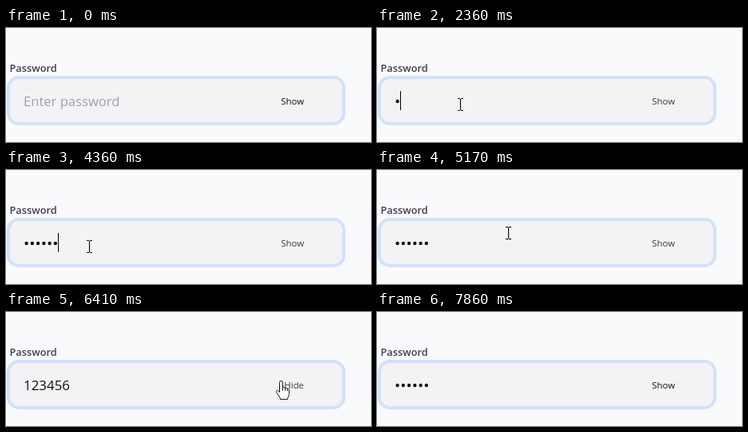
An HTML page for the animation above (8.74 s loop, 457 px wide and 143 px high).

```html
<!DOCTYPE html>
<html lang="en">
<head>
<meta charset="utf-8">
<title>Password field</title>
<style>
  html, body { margin: 0; width: 100%; height: 100%; overflow: hidden; background: #f8fafc; }
  svg { display: block; width: 457px; height: 143px; }
  text { font-family: "Open Sans", "Noto Sans", sans-serif; }
  #label { font-size: 12.8px; font-weight: 600; fill: #3f3d56; }
  #hint { font-size: 16.6px; fill: #9ea2ab; }
  #plain { font-size: 16.9px; fill: #111; }
  #toggle { font-size: 11.4px; text-anchor: end; }
  #glow { fill: #fdf046; mix-blend-mode: multiply; }
  .solid { fill: #fff; stroke: #111; stroke-linejoin: round; }
</style>
</head>
<body>
<svg viewBox="0 0 457 143">
  <text id="label" x="4.5" y="55">Password</text>
  <rect x="3" y="62" width="420" height="58" rx="13" fill="#f2f3f5" stroke="#d1e2fa" stroke-width="4"/>
  <text id="hint" x="22" y="98">Enter password</text>
  <text id="plain" x="22" y="98">123456</text>
  <g id="dots" fill="#111"></g>
  <rect id="caret" y="79" width="1" height="24"/>
  <text id="toggle" x="373" y="96"></text>
  <circle id="glow" r="12"/>
  <g id="pointer">
    <path id="beam" d="M-3.5-7.5h3m1 0h3M0-7V7M-3.5 7.5h3m1 0h3" fill="none" stroke="#111" stroke-width="1.2"/>
    <path id="hand" class="solid" d="M-2.5 2a2 2 0 0 1 4 0v6q1.7-1 3 .8q1.7-.8 2.8.8q2-.4 2.2 1.5v5c0 3-2 4-2 7h-9c0-3-3.5-6-5-9c-.8-1.8 1.2-3.1 2.5-1.5l1.5 1.6zM1.5 8v4M4.5 8.8v3.4M7.3 9.6v3"/>
    <path id="arrow" class="solid" d="M0 0v16l3.7-3.4 2.6 5.8 2.6-1.2-2.6-5.6h5.2z"/>
  </g>
</svg>
<script>
const LOOP = 8740, PITCH = 7.25, LEFT = 22;
const KEYS = [2360, 2710, 2970, 3300, 4030, 4360];
const CARET_ON = [[1380, 1900], [2360, 3830], [4030, 4890], [5420, 5940]];
const GLOW_ON = [[1250, 1380], [6140, 6340], [6870, 7130]];

const $ = id => document.getElementById(id);
const show = (id, on) => $(id).style.display = on ? "" : "none";
const within = (t, spans) => spans.some(([a, b]) => t >= a && t < b);
const stepOf = (t, start, end, count) =>
  Math.max(0, Math.min(count, Math.floor((t - start) / (end - start) * count + 1e-6)));

$("dots").innerHTML = KEYS.map((_, i) =>
  `<circle cx="${LEFT + PITCH * (i + 0.5)}" cy="92" r="2.2"/>`).join("");

function pointerAt(t) {
  if (t < 520 || t >= 7860) return null;
  if (t < 4890) {
    const u = stepOf(t, 520, 990, 7) / 7, e = 1 - (1 - u) ** 2;
    return [312 - 207.5 * e, 130 - 34 * e];
  }
  if (t < 7460) {
    const k = stepOf(t, 4890, 5740, 12);
    if (k === 12) return [345, 86.5];
    if (k === 11) return [368.5, 91];
    const v = k / 10, e = v * v * (3 - 2 * v);
    return [104.5 + 278.5 * e, 96 - 2.5 * e - 26 * Math.sin(Math.PI * e)];
  }
  const u = (stepOf(t, 7460, 7860, 6) + 1) / 7;
  return [345 + 85 * u, 86.5 + 58 * u * u];
}

function draw(t) {
  const typed = KEYS.filter(k => t >= k).length;
  const revealed = t >= 6410 && t < 7130;
  show("hint", !typed);
  show("plain", revealed);
  show("dots", !revealed);
  [...$("dots").children].forEach((dot, i) => dot.style.display = i < typed ? "" : "none");

  show("caret", within(t, CARET_ON));
  $("caret").setAttribute("x", Math.floor(LEFT + PITCH * typed));

  $("toggle").textContent = revealed ? "Hide" : "Show";
  $("toggle").style.fill = t >= 1440 && t < 7130 ? "#3a3a3c" : "#111";

  const p = pointerAt(t);
  show("pointer", p);
  show("glow", p && within(t, GLOW_ON));
  if (!p) return;
  const [x, y] = p;
  const kind = y > 121 ? "arrow" : x > 335 && x < 388 ? "hand" : "beam";
  for (const id of ["beam", "hand", "arrow"]) show(id, id === kind);
  $("pointer").setAttribute("transform", `translate(${x} ${y})`);
  $("glow").setAttribute("cx", x - 2);
  $("glow").setAttribute("cy", y - 1);
}

const start = performance.now();
function tick() {
  draw((performance.now() - start) % LOOP);
  requestAnimationFrame(tick);
}
tick();
</script>
</body>
</html>
```
